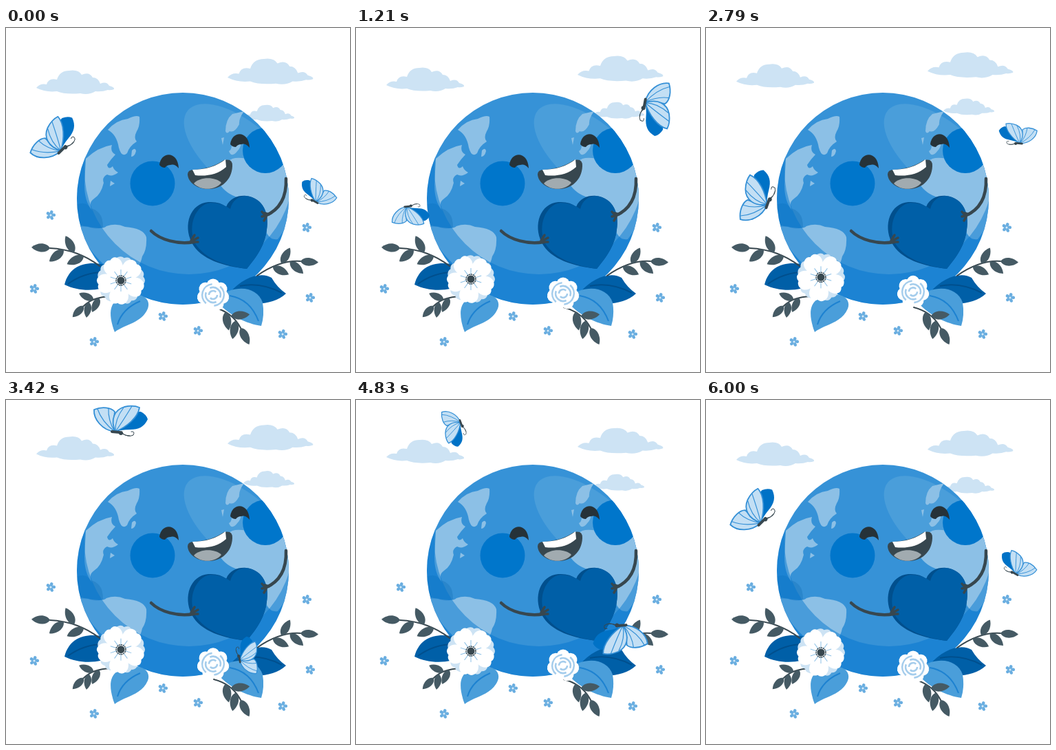
An HTML page that plays this animation: 500x500 px, repeating every 6040 ms.

```html
<!DOCTYPE html>
<html lang="en">
<head>
<meta charset="utf-8">
<title>Happy Earth</title>
<style>
html, body { margin: 0; width: 100%; height: 100%; overflow: hidden; background: #fff; }
svg { display: block; width: 100%; height: 100%; }
.line { fill: none; stroke: #37474f; stroke-linecap: round; }
.dark { fill: #37474f; }
.land { fill: #8cc0e6; }
.wing { fill: #c3dff4; stroke: #338fd6; stroke-width: 1.8; }
.vein { fill: none; stroke: #338fd6; stroke-width: 1.2; }
</style>
</head>
<body>
<svg viewBox="0 0 500 500">
<defs>
  <clipPath id="globe"><circle cx="257" cy="248" r="154"/></clipPath>
  <path id="cloud" fill="#cde3f4" d="M0 25Q6 18 15 20Q18 10 30 13Q34 0 48 0Q61-2 66 6Q77 1 82 10Q90 10 93 19Q102 15 106 22Q114 24 113 27Q108 29 104 28Q96 31 86 30Q76 36 64 33Q42 35 30 30Q14 32 0 25Z"/>
  <path id="eye" fill="#263238" d="M223 199C225 179 250 178 251 204Q245 197 239 199Q234 199 231 203Q226 203 223 199Z"/>
  <!-- butterfly: thorax at 0,0, head to the right -->
  <g id="fly">
    <path fill="#0072c6" d="M-3 -1C3 -19 23 -31 34 -30Q42 -26 44 -19C39 -8 31 -4 18 -4Q6 -4 -3 -1Z"/>
    <path class="wing" d="M-4 -1C-22 -3 -35 -19 -34 -33C-22 -38 -9 -36 -4 -30Q-6 -14 -4 -1Z"/>
    <path class="wing" d="M-3 -1C-11 -19 -4 -33 10 -37Q23 -40 32 -36C30 -22 14 -8 -3 -1Z"/>
    <path class="vein" d="M-3 -1Q-4 -19 9 -36M-3 -1Q7 -15 21 -38M-4 -1Q-14 -18 -13 -35M-4 -1Q-23 -16 -29 -34"/>
    <path class="line" stroke-width="4" d="M-8 -1L3 0"/>
    <circle class="dark" cx="5" cy="1" r="3"/>
    <path class="line" stroke-width="1" d="M7 1Q15 8 23 4Q26 -2 20 -1M7 2Q11 5 18 5"/>
  </g>
</defs>

<g class="float" data-rise="10">
  <use href="#cloud" x="44" y="62"/>
  <use href="#cloud" transform="translate(322 45) scale(1.1 1.08)"/>
  <use href="#cloud" transform="translate(345 112) scale(.655 .7)"/>
</g>

<g clip-path="url(#globe)">
  <rect x="100" y="90" width="320" height="320" fill="#3692d7"/>
  <ellipse cx="341" cy="184" rx="100" ry="47" transform="rotate(40 341 184)" fill="#4a9eda"/>
  <path class="land" d="M148 148Q160 134 177 132Q189 126 194 129Q195 142 190 150Q185 160 190 165Q179 172 176 182Q168 189 164 174Q161 155 148 148Z
    M183 178Q188 173 189 179Q187 187 182 187Z
    M116 190Q134 173 154 170Q151 180 159 184Q153 190 147 199Q149 207 155 201Q157 207 163 210Q154 217 147 213Q139 217 142 225Q138 242 128 248Q119 254 125 265Q114 252 114 228Z
    M152 222L158 226L151 230Z
    M100 285Q140 295 146 288Q160 283 173 289Q200 291 204 304Q205 322 198 332Q194 352 174 366Q130 345 100 285Z
    M319 150Q319 133 329 125L346 121Q338 132 339 140Q332 153 325 150Q321 155 319 150Z
    M327 163L336 160Q346 168 337 178Q328 190 324 179Q330 176 327 163Z
    M313 160L317 159L315 170Z
    M312 229Q322 215 323 194Q330 186 350 190L420 180V270Q408 290 395 307Q378 310 374 280Q366 252 344 248Q323 244 312 229Z"/>
  <path fill="#005a9e" opacity=".22" d="M100 258Q115 250 123 262Q130 263 136 270Q141 276 141 290Q126 294 119 288L100 290Z"/>
  <path fill="#0074cd" opacity=".48" fill-rule="evenodd" d="M90 80H430V420H90ZM114 206a152 152 0 1 0 304 0a152 152 0 1 0 -304 0Z"/>
  <circle cx="377" cy="178" r="33" fill="#0076cb"/>
</g>
<circle cx="213" cy="226" r="32.5" fill="#0076cb"/>
<use href="#eye"/>
<use href="#eye" x="103" y="-30"/>
<path class="dark" d="M264 213Q264 206 273 206C291 205 305 200 317 192Q330 189 329 201C328 222 312 235 292 234C276 233 265 224 264 213Z"/>
<path fill="#fff" d="M271 206C290 206 306 201 319 191L320 202C308 213 291 216 275 214Z"/>
<path fill="#a1abb0" d="M273 226C282 216 304 216 313 225C305 235 285 238 273 226Z"/>

<path fill="#004f8d" d="M350 350C317 346 283 337 270 312C257 286 268 255 294 253Q311 252 320 260C325 247 338 243 349 244C374 247 383 270 379 293C376 318 362 335 350 350Z"/>
<path fill="#005fa7" d="M350 350C320 346 289 336 275 313C263 287 276 257 297 254Q314 254 326 263C329 250 339 244 349 244C374 247 383 270 379 293C376 318 362 335 350 350Z"/>
<g class="line" stroke-width="4.5">
  <path d="M211 295C224 308 250 315 273 311M407 219C408 246 398 264 377 273"/>
  <path stroke-width="3.5" d="M269 309L274 301M271 309L279 305M271 311L279 311M377 273L372 267M377 273L372 274M378 275L375 280M376 269L382 271"/>
</g>

<path fill="#005fa7" d="M85 373C92 345 116 338 144 344L155 372C137 383 107 384 85 373Z"/>
<path fill="#005fa7" d="M325 385C345 361 372 354 386 363Q394 377 407 386C390 402 360 404 335 396Z"/>
<path fill="none" stroke="#004f8d" stroke-width="2" d="M90 372Q115 354 145 355M340 375Q370 369 401 385"/>
<path fill="#4a9eda" d="M158 442C148 415 148 392 180 388C200 385 211 395 206 408C197 429 174 430 158 442Z"/>
<path fill="#4a9eda" d="M309 390C335 372 365 376 373 399Q376 417 371 433C350 430 325 418 309 400Z"/>
<path fill="none" stroke="#1d82d1" stroke-width="2" d="M162 431Q169 408 195 397M325 389Q355 394 367 426"/>
<g id="twigs" class="line" stroke-width="2"></g>
<g id="dots" fill="#6aaee0"></g>

<g class="float" data-rise="5">
  <g id="bloom" transform="translate(167 367)"></g>
  <g id="rose" transform="translate(301 388)"></g>
</g>

<g id="flies">
  <use href="#fly" transform="rotate(-50 261 197) translate(162 47)"/>
  <use href="#fly" transform="translate(448 252) rotate(35) scale(-.7 .7)"/>
</g>
</svg>
<script>
const $ = id => document.getElementById(id);
const add = (id, markup) => $(id).insertAdjacentHTML('beforeend', markup);
const ring = (n, start, part) =>
  Array.from({ length: n }, (_, i) => `<g transform="rotate(${start + i * 360 / n})">${part}</g>`).join('');

// A curved stem with one leaf at its tip and three on alternating sides
function twig(x0, y0, cx, cy, x1, y1, side, len) {
  add('twigs', `<path d="M${x0} ${y0}Q${cx} ${cy} ${x1} ${y1}"/>`);
  [.35, .55, .75, 1].forEach((t, i) => {
    const u = 1 - t;
    const x = u * u * x0 + 2 * u * t * cx + t * t * x1;
    const y = u * u * y0 + 2 * u * t * cy + t * t * y1;
    const ahead = Math.atan2(u * (cy - y0) + t * (y1 - cy), u * (cx - x0) + t * (x1 - cx)) * 180 / Math.PI;
    const turn = t < 1 ? side * (i % 2 ? -45 : 50) : 0;
    add('twigs', `<path fill="#455a64" stroke="none" transform="translate(${x} ${y}) rotate(${ahead + turn}) scale(${len})"
      d="M0 0C.2 -.32 .7 -.28 1 0C.7 .28 .2 .32 0 0Z"/>`);
  });
}
twig(136, 346, 105, 322, 64, 320, -1, 27);
twig(152, 390, 126, 391, 113, 404, -1, 23);
twig(365, 360, 398, 337, 428, 339, 1, 26);
twig(302, 406, 329, 413, 341, 436, 1, 27);

const dots = [[65, 272], [41, 379], [128, 456], [228, 419], [279, 440], [402, 445], [442, 392], [437, 290]];
const dot = ring(5, 15, '<ellipse cy="-4.3" rx="2.3" ry="2.8"/>') + '<circle r="2.6"/><circle r="1.5" fill="#d9ebf8"/>';
for (const [x, y] of dots) add('dots', `<g transform="translate(${x} ${y})">${dot}</g>`);

const petal = fill => `<path fill="${fill}" d="M0 0C-14 -10 -19 -27 -9 -33Q-4 -36 0 -33Q7 -37 11 -31C17 -24 12 -10 0 0Z"/>`;
add('bloom', ring(5, 8, petal('#cde3f4')) + ring(5, -28, petal('#fff'))
  + ring(10, 0, '<path stroke="#8cc0e6" d="M0 -6V-16"/>')
  + '<circle r="5.5" fill="#37474f"/><circle r="7" class="line" stroke-width="1.5" stroke-dasharray="1 2"/>');

add('rose', ring(7, 0, '<circle cy="-14" r="9.5" fill="#fff"/>') + '<circle r="15" fill="#fff"/>');
[6, 11, 16].forEach((r, i) =>
  add('rose', ring(2, i * 65, `<path fill="none" stroke="#a5cdec" stroke-width="2.6" d="M${-r} 0A${r} ${r} 0 0 1 ${r * .7} ${-r * .7}"/>`)));

const LOOP = 6040, STEP = 1000 / 24, LAST = 144, TURN = 3000;
const floats = document.querySelectorAll('.float');

function draw() {
  const frame = Math.min(LAST, Math.floor((performance.now() % LOOP + 5) / STEP));
  const time = frame * STEP;
  const lift = 1 - Math.abs(1 - time / TURN);
  for (const el of floats) el.setAttribute('transform', `translate(0 ${-lift * el.dataset.rise})`);
  $('flies').setAttribute('transform', `rotate(${time * 360 / TURN} 261 197)`);
  requestAnimationFrame(draw);
}
draw();
</script>
</body>
</html>
```
